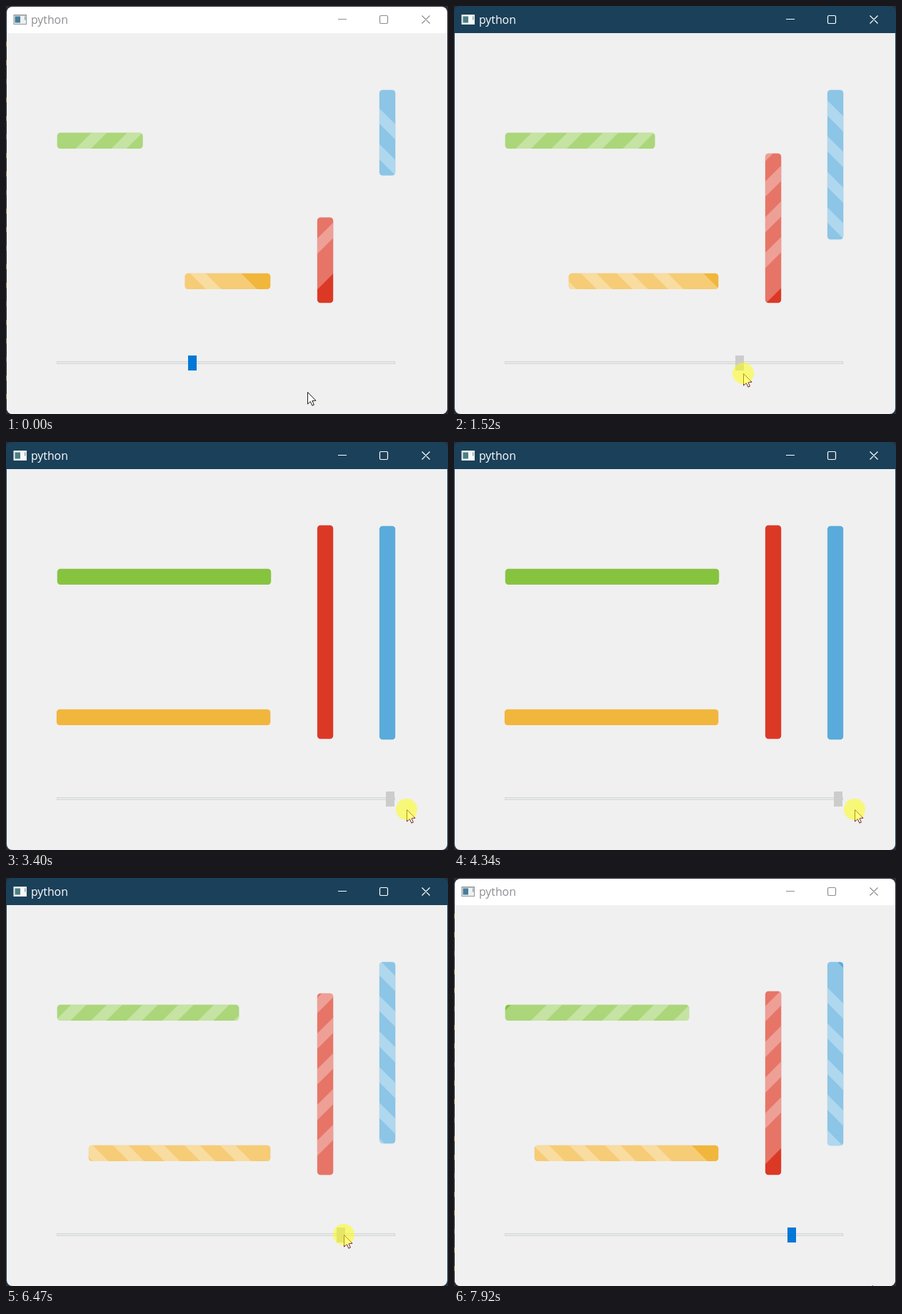
Animation of 619 by 572 pixels, one loop 7990 ms. Source, as an HTML page with a canvas:

```html
<!DOCTYPE html>
<html lang="en">
<head>
<meta charset="utf-8">
<title>python</title>
<style>
html, body { margin: 0; width: 100%; height: 100%; overflow: hidden; background: #2a2e36; }
canvas { display: block; width: 619px; height: 572px; }
</style>
</head>
<body>
<canvas id="stage" width="619" height="572"></canvas>
<script>
const ctx = document.getElementById('stage').getContext('2d');
const LOOP = 7990, STEP = LOOP / 115;
const PRESS = 700, RELEASE = 6560, BLUR = 7915;
const PERIOD = 50, STRIPE = 21.5, THICK = 22.3;
const TRACK = 71, GRAB = 10;

// Where the pointer rests or turns: time, x, y.
const STOPS = [
  [0, 422, 541], [600, 266, 503], [PRESS, 266, 503], [1520, 405, 515], [2510, 246, 499],
  [3400, 561, 515], [4810, 561, 515], [5020, 568, 526], [5420, 568, 526],
  [6470, 473, 500], [RELEASE, 477, 501], [7000, 586, 571]
];

// Each bar starts at (x, y) and grows along dir; back bars share the later stripe phase.
const BARS = [
  { x: 71.7, y: 177.7, dir: [1, 0], side: [0, 1], color: '#86c440' },
  { x: 370.3, y: 374.8, dir: [-1, 0], side: [0, 1], color: '#f1b63c', back: true },
  { x: 458.2, y: 416.3, dir: [0, -1], side: [-1, 0], color: '#db3926', back: true },
  { x: 545.2, y: 117.7, dir: [0, 1], side: [-1, 0], color: '#5aabdb' }
];

const clamp = (v, lo, hi) => Math.min(hi, Math.max(lo, v));
const ease = k => k * k * (3 - 2 * k);

function pointerAt(t) {
  const i = STOPS.findIndex(s => s[0] > t);
  if (i < 0) return STOPS.at(-1).slice(1);
  const [t0, x0, y0] = STOPS[i - 1], [t1, x1, y1] = STOPS[i];
  const k = ease((t - t0) / (t1 - t0));
  return [Math.round(x0 + (x1 - x0) * k), Math.round(y0 + (y1 - y0) * k)];
}

// The slider follows the pointer while it is held.
function valueAt(t) {
  const [x] = pointerAt(clamp(t, PRESS, RELEASE));
  return clamp(Math.round((x - GRAB - TRACK) / 4.62), 40, 100);
}

// The stripes restart after the bars have been full.
function shiftAt(t) {
  const u = t < 5000 ? 0.0582 * t - 2 : 0.0608 * (t - 6470) + 20;
  return (u + 36) % PERIOD - 36;
}

function box(x, y, w, h, r, fill) {
  ctx.beginPath();
  ctx.roundRect(x, y, w, h, r);
  ctx.fillStyle = fill;
  ctx.fill();
}

function rect(x, y, w, h, fill) {
  ctx.fillStyle = fill;
  ctx.fillRect(x, y, w, h);
}

// Slanted band from u to u + w, measured on the near side.
function band(u, w) {
  ctx.beginPath();
  ctx.moveTo(u, 0);
  ctx.lineTo(u + w, 0);
  ctx.lineTo(u + w - THICK, THICK);
  ctx.lineTo(u - THICK, THICK);
  ctx.fill();
}

function drawBar(bar, value, shift) {
  const len = 2.995 * value;
  const u = shift + (bar.back ? 55 - len / 10 : 0);
  ctx.save();
  ctx.transform(...bar.dir, ...bar.side, bar.x, bar.y);
  box(0, 0, len, THICK, 4.5, bar.color);
  if (value < 100) {
    ctx.clip();
    ctx.fillStyle = 'rgba(255,255,255,.3)';
    band(u, len + 120);
    for (let x = u + PERIOD; x < len + THICK; x += PERIOD) band(x, STRIPE);
  }
  ctx.restore();
}

function drawFrame(active) {
  rect(0, 0, 619, 572, '#2a2e36');
  if (active) {
    box(0, 0, 619, 572, 8, '#1b4059');
  } else {
    for (let y = 50; y < 560; y += 26) rect(0, y, 1, 7, y % 3 ? '#8d6a3e' : '#4a5664');
  }
  box(1, 1, 617, 571, 8, active ? '#1b4059' : '#fff');
  box(1, 38, 617, 534, [0, 0, 8, 8], '#f0f0f0');
}

function drawTitle(active) {
  const ink = active ? '#fff' : '#8b8e91';
  rect(10.5, 12, 18.5, 14, active ? '#e4eceb' : '#8d9499');
  rect(11.5, 13.5, 16.5, 11.5, active ? '#f5f8f7' : '#edf0f1');
  rect(12.5, 14.5, 7.5, 9, active ? '#4c7f84' : '#477d9a');
  rect(26, 14.5, 1.5, 5, '#8fa6a4');

  ctx.font = '15.8px "Open Sans", "Noto Sans", sans-serif';
  ctx.fillStyle = ink;
  ctx.fillText('python', 35, 25);

  ctx.strokeStyle = ink;
  ctx.lineWidth = 1.2;
  ctx.beginPath();
  ctx.moveTo(465, 18.5);
  ctx.lineTo(477, 18.5);
  ctx.roundRect(523.5, 13.5, 11, 11, 1.5);
  ctx.moveTo(582.5, 13.5);
  ctx.lineTo(593.5, 24.5);
  ctx.moveTo(593.5, 13.5);
  ctx.lineTo(582.5, 24.5);
  ctx.stroke();
}

function drawSlider(value, pressed) {
  rect(TRACK, 498, 474, 4, '#d6d6d6');
  rect(TRACK + 1, 499, 472, 2, '#e7eaea');
  rect(Math.round(TRACK + 4.61 * value), 490, 12, 21, pressed ? '#cccccc' : '#0078d7');
}

function drawPointer(x, y, pressed) {
  ctx.save();
  ctx.translate(x + 0.5, y + 0.5);
  ctx.beginPath();
  ctx.moveTo(0, 0);
  ctx.lineTo(0, 16.5);
  ctx.lineTo(3.8, 13);
  ctx.lineTo(6.4, 18.7);
  ctx.lineTo(8.9, 17.6);
  ctx.lineTo(6.4, 12);
  ctx.lineTo(11.5, 11.7);
  ctx.closePath();
  ctx.fillStyle = '#fff';
  ctx.fill();
  ctx.strokeStyle = pressed ? '#6e2018' : '#1c1c1c';
  ctx.lineWidth = 1;
  ctx.stroke();
  ctx.restore();
  if (pressed) {
    ctx.beginPath();
    ctx.arc(x, y, 15, 0, 2 * Math.PI);
    ctx.fillStyle = 'rgba(255,255,0,.5)';
    ctx.fill();
  }
}

function draw(now) {
  const t = Math.floor((now % LOOP + 10) / STEP) * STEP % LOOP;
  const active = t >= PRESS && t < BLUR;
  const pressed = t >= PRESS && t < RELEASE;
  const value = valueAt(t), shift = shiftAt(t);

  drawFrame(active);
  drawTitle(active);
  for (const bar of BARS) drawBar(bar, value, shift);
  drawSlider(value, pressed);
  drawPointer(...pointerAt(t), pressed);
}

const began = performance.now();
function tick() {
  draw(performance.now() - began);
  requestAnimationFrame(tick);
}
tick();
</script>
</body>
</html>
```
